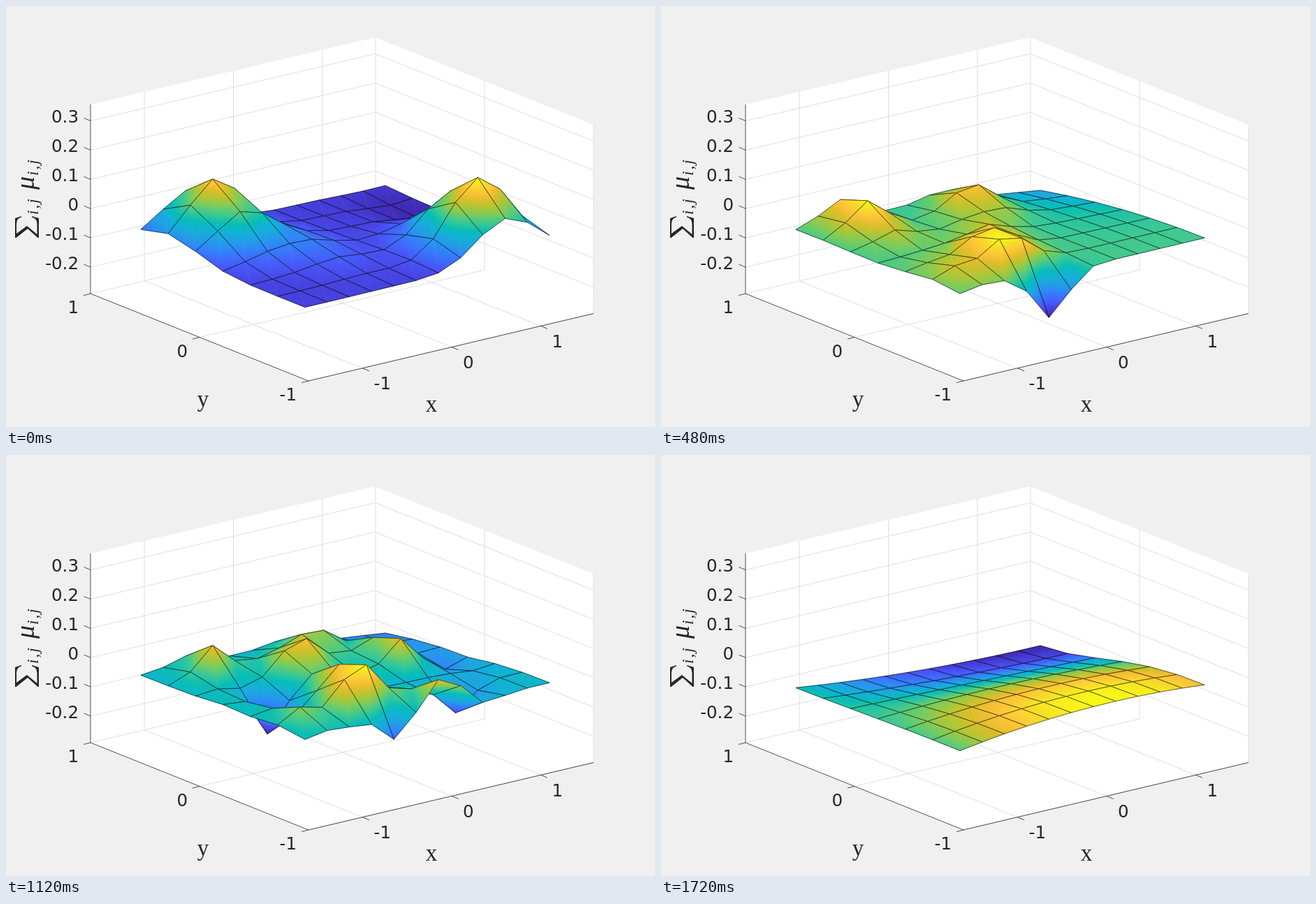
An HTML page with a canvas that plays this animation: 929x603 px, repeating every 1.88 s.

```html
<!DOCTYPE html>
<html lang="en">
<head>
<meta charset="utf-8">
<title>Surface plot</title>
<style>
  html, body { margin: 0; width: 100%; height: 100%; overflow: hidden; background: #f0f0f0; }
  svg, canvas { position: absolute; left: 0; top: 0; width: 929px; height: 603px; }
  .tick { font: 24.5px "DejaVu Sans", sans-serif; fill: #262626; }
  .math { font: 33px "Liberation Serif", serif; fill: #262626; }
  .mu { font-size: 38px; font-style: italic; }
  .sub { font-size: 23px; font-style: italic; letter-spacing: 2px; }
</style>
</head>
<body>
<svg id="axes" viewBox="0 0 929 603">
  <path d="M121 141L528.5 45L841 170V440.5L433 537L121 412Z" fill="#fff"/>
  <path id="grid" fill="none" stroke="#dedede" stroke-width="1"/>
  <path id="frame" fill="none" stroke="#262626" stroke-width="0.8"/>
  <text class="math" x="609" y="581" text-anchor="middle">x</text>
  <text class="math" x="282" y="574" text-anchor="middle">y</text>
  <g transform="translate(40 333) rotate(-90)">
    <path d="M1 -27H29L32 -18H30.5Q29 -25 21 -25H7L18 -10L6 4.5H21Q29 4.5 30.5 -3H32L29 7H1V5.5L14 -9L1 -25.5Z" fill="#262626"/>
    <text class="math sub" x="34" y="6">i,j</text>
    <text class="math mu" x="70" y="0">μ</text>
    <text class="math sub" x="90" y="6">i,j</text>
  </g>
</svg>
<canvas id="plot" width="929" height="603"></canvas>
<script>
const NX = 12, NY = 7, LOOP = 1880;
const ctx = document.getElementById('plot').getContext('2d');

// ---- axes ----
const svg = document.getElementById('axes');
const label = (text, x, y, anchor) => {
  const el = document.createElementNS('http://www.w3.org/2000/svg', 'text');
  el.setAttribute('class', 'tick');
  el.setAttribute('x', x);
  el.setAttribute('y', y);
  el.setAttribute('text-anchor', anchor);
  el.textContent = text;
  svg.append(el);
};

function drawAxes() {
  let grid = '', frame = 'M121 141V412L433 537L841 440.5';
  for (let n = 0; n < 6; n++) {
    const y = 164.5 + 41.9 * n;
    grid += `M121 ${y}L528.5 ${y - 96}L841 ${y + 29}`;
    frame += `M121 ${y}l-9.5 -4`;
    label(String((3 - n) / 10), 104, y + 2.5, 'end');
  }
  for (let n = -1; n <= 1; n++) {
    const x = 638 + 127.4 * n, y = 488.5 - 30.3 * n;
    grid += `M${x} ${y}l-312.5 -125v-271`;
    frame += `M${x} ${y}l9.5 4`;
    label(String(n), x + 16, y + 30.5, 'start');

    const u = 277 - 156 * n, v = 474.5 - 62.5 * n;
    grid += `M${u} ${v}l408 -96.5v-271`;
    frame += `M${u} ${v}l-10 2.5`;
    label(String(n), u - 17, v + 28, 'end');
  }
  document.getElementById('grid').setAttribute('d', grid);
  document.getElementById('frame').setAttribute('d', frame);
}

// ---- surface poses ----
const everyNode = height =>
  Array.from({ length: NX * NY }, (_, k) => height(k % NX, Math.floor(k / NX)));

// A level sheet that sinks towards the far corner, lifted by Gaussian hills
// whose strengths are solved so that it passes through the keys [column, row, height].
function hilly({ level, drop, width, keys }) {
  const hills = keys.map(([i, j, h]) => ({ i, j, h, strength: 0 }));
  const height = (i, j) => hills.reduce(
    (sum, hill) => sum + hill.strength * Math.exp(-((i - hill.i) ** 2 + (j - hill.j) ** 2) / width ** 2),
    level + drop * (i / (NX - 1) * j / (NY - 1)) ** 2);
  for (let pass = 0; pass < 200; pass++)
    for (const hill of hills) hill.strength += hill.h - height(hill.i, hill.j);
  return everyNode(height);
}

// The same hills around a new level, flattened by scale, with some keys added or moved.
function adapt(pose, level, scale, keys) {
  const kept = pose.keys.filter(([i, j]) => !keys.some(key => key[0] === i && key[1] === j));
  const moved = kept.map(([i, j, h]) => [i, j, level + (h - pose.level) * scale]);
  return { ...pose, level, keys: [...moved, ...keys] };
}

const smoothSheet = everyNode((i, j) => {
  const u = i / (NX - 1), v = (j / (NY - 1)) ** 1.3;
  const front = -32 + 58 * u - 47 * u * u;
  const back = -36 - 46 * u + 23 * u * u;
  return front + (back - front) * v * v * (3 - 2 * v);
});

const twinPeaks = {
  level: -40, drop: -2, width: 1.5,
  keys: [[2, 5, 50], [3, 5, 29], [0, 5, -13], [4, 3, -20],
    [9, 1, 62], [10, 1, 38], [8, 1, 34], [9, 0, 19], [10, 4, -50]]
};
const tallBack = {
  level: 5, drop: 0, width: 1.2,
  keys: [[5, 5, -8], [6, 5, 59], [7, 5, 130], [9, 5, 140], [10, 5, 87], [7, 4, 79], [9, 4, 85],
    [4, 0, -126], [4, 1, -3], [0, 0, 24], [0, 2, -28], [2, 5, 61], [0, 5, -7], [9, 1, 50]]
};
const lowHills = {
  level: -24, drop: -26, width: 1.1,
  keys: [[4, 0, -85], [3, 1, 19], [4, 1, 13], [1, 1, -4], [3, 2, 7], [5, 3, -6],
    [2, 5, 19], [2, 6, 5], [7, 5, 4], [6, 5, 0]]
};
const leftPit = {
  level: -19, drop: -23, width: 0.9,
  keys: [[2, 3, -77], [1, 3, -17], [4, 0, -59], [4, 1, 45], [3, 1, 36], [5, 1, 6], [1, 1, 9],
    [6, 0, 28], [7, 0, 10], [2, 5, 29], [6, 5, 13], [7, 5, 11]]
};
const manyPeaks = adapt(leftPit, -18, 0.9, [
  [4, 0, -46], [4, 1, 45], [4, 2, 30], [8, 1, -54], [5, 4, 28], [4, 4, 18],
  [8, 3, 21], [8, 4, 7], [10, 3, -38]]);
const sinking = adapt(manyPeaks, -29, 0.65, [
  [4, 0, -62], [0, 0, -54], [6, 0, 16], [6, 1, -12], [6, 2, -75], [5, 4, 20],
  [6, 5, -33], [7, 5, -40]]);

const poses = [twinPeaks, tallBack, lowHills, leftPit, manyPeaks, sinking].map(hilly);
poses.push(smoothSheet);

// Start times in ms: each group steps evenly from one pose towards the next.
const groups = [[0, 120], [280, 400], [480, 640, 720], [880, 1000], [1120, 1200, 1320], [1400, 1560], [1720]];
const cues = groups.flatMap((starts, n) => starts.map((start, k) => ({ start, n, part: k / starts.length })));

function heightsAt({ n, part }) {
  if (!part) return poses[n];
  return poses[n].map((from, k) => {
    // the first change spreads from the front row to the back
    const weight = n ? part : 1 - Math.floor(k / NX) / (NY - 1);
    return from + (poses[n + 1][k] - from) * weight;
  });
}

// ---- drawing ----
const parula = ['#3e26a8', '#453bd6', '#4852f4', '#3f6cfd', '#2e87f7', '#229fe5', '#12b1d6', '#08bdb5',
  '#37c897', '#70cc64', '#abc739', '#dbbe29', '#fec338', '#f7de28', '#f9fb15'];

function outline(...points) {
  ctx.beginPath();
  for (const p of points) ctx.lineTo(p.x, p.y);
  ctx.closePath();
}

// Height is linear over a triangle, so one linear gradient shades it.
function fillTriangle(a, b, c) {
  const dx1 = b.x - a.x, dy1 = b.y - a.y, dx2 = c.x - a.x, dy2 = c.y - a.y;
  const det = dx1 * dy2 - dx2 * dy1;
  if (Math.abs(det) < 0.01) return;
  const t1 = b.t - a.t, t2 = c.t - a.t;
  let gx = (t1 * dy2 - t2 * dy1) / det, gy = (t2 * dx1 - t1 * dx2) / det;
  if (gx * gx + gy * gy < 1e-9) { gx = 4e-5; gy = 0; }
  const g = gx * gx + gy * gy;
  const p = -a.t / g, q = (1 - a.t) / g;
  const shade = ctx.createLinearGradient(a.x + gx * p, a.y + gy * p, a.x + gx * q, a.y + gy * q);
  parula.forEach((color, k) => shade.addColorStop(k / (parula.length - 1), color));
  ctx.fillStyle = ctx.strokeStyle = shade;
  ctx.lineWidth = 0.6;
  outline(a, b, c);
  ctx.fill();
  ctx.stroke();
}

function drawSurface(cue) {
  const heights = heightsAt(cue);
  const low = Math.min(...heights), span = Math.max(...heights) - low;
  const nodes = everyNode((i, j) => {
    const h = heights[j * NX + i];
    return {
      x: 428 + 31.82 * i - 39.17 * j,
      y: 391.5 - 7.575 * i - 15.69 * j - h,
      t: (h - low) / span
    };
  });
  ctx.clearRect(0, 0, 929, 603);
  ctx.lineJoin = 'round';
  for (let j = NY - 2; j >= 0; j--)
    for (let i = NX - 2; i >= 0; i--) {
      const k = j * NX + i;
      const a = nodes[k], b = nodes[k + 1], c = nodes[k + NX + 1], d = nodes[k + NX];
      fillTriangle(a, b, c);
      fillTriangle(a, c, d);
      ctx.strokeStyle = '#000';
      ctx.lineWidth = 0.6;
      outline(a, b, c, d);
      ctx.stroke();
    }
}

let shown;
const begin = performance.now();
function tick() {
  const time = (performance.now() - begin) % LOOP;
  const cue = cues.findLast(({ start }) => start <= time);
  if (cue !== shown) drawSurface(shown = cue);
  requestAnimationFrame(tick);
}

drawAxes();
tick();
</script>
</body>
</html>
```
